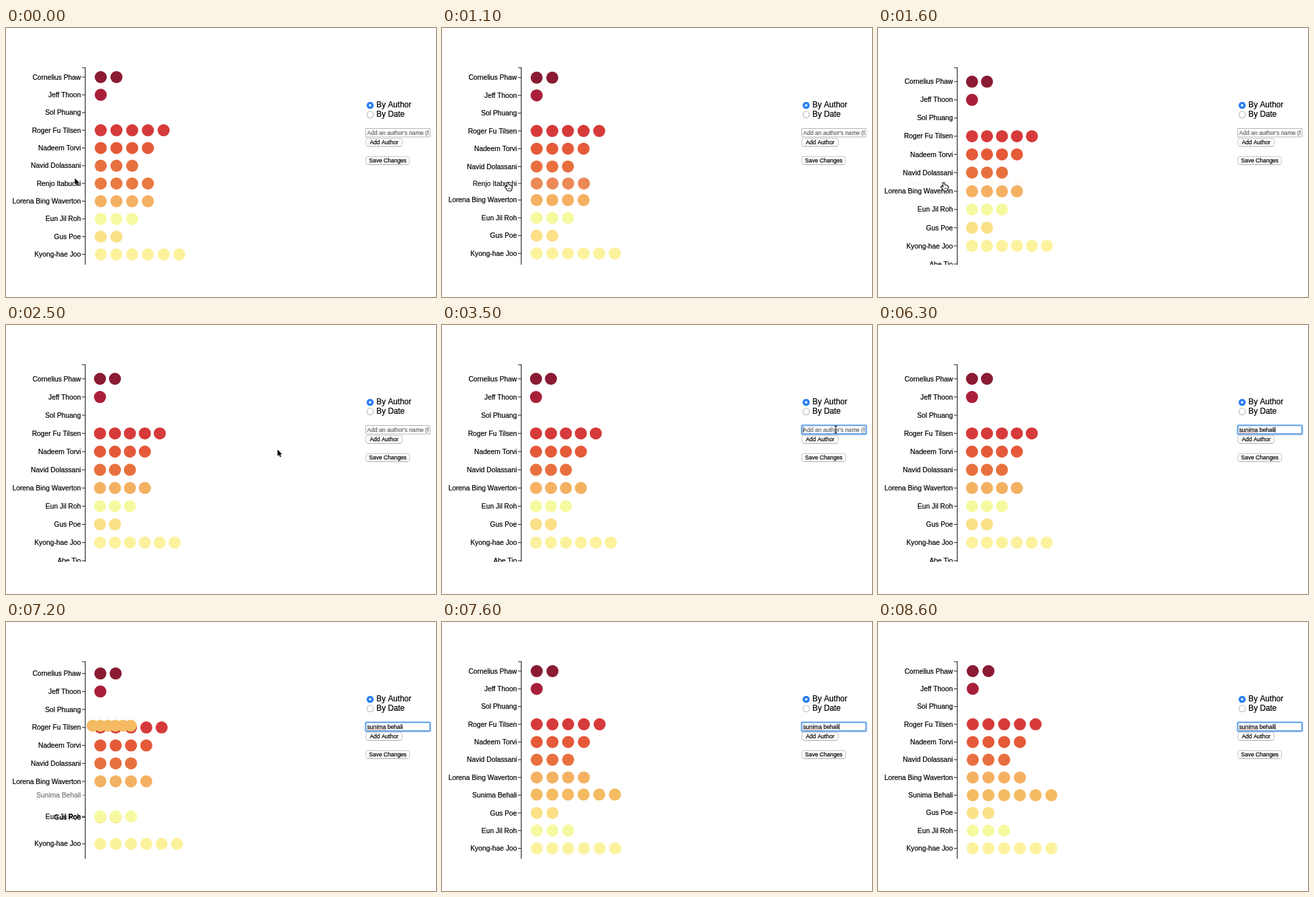
Write an HTML page with a canvas that moves like this. It is 640 by 400 pixels and loops after 8.7 s.

```html
<!DOCTYPE html>
<html lang="en">
<head>
<meta charset="utf-8">
<title>Author dot chart</title>
<style>
html, body { margin: 0; width: 100%; height: 100%; overflow: hidden; background: #fff; }
canvas { display: block; width: 640px; height: 400px; }
</style>
</head>
<body>
<canvas id="stage"></canvas>
<script>
const canvas = document.getElementById('stage');
const ctx = canvas.getContext('2d');
const ratio = window.devicePixelRatio || 1;
canvas.width = 640 * ratio;
canvas.height = 400 * ratio;

const LOOP = 8700;
const SANS = '"Liberation Sans", Arial, sans-serif';
const AXIS = 118, TOP = 59, BOTTOM = 352;
const REMOVE_AT = 800, ADD_AT = 6707, MOVE = 1000;
const FOCUS_AT = 3200, TYPE_AT = 4200;
const TYPED = 'sunima behali';

// slots: row index in the first, the shortened and the last layout
const rows = [
  { name: 'Cornelius Phaw', color: '#8a1b33', dots: 2, slots: [0, 0, 0] },
  { name: 'Jeff Thoon', color: '#a91f3a', dots: 1, slots: [1, 1, 1] },
  { name: 'Sol Phuang', color: '#c42d3a', dots: 0, slots: [2, 2, 2] },
  { name: 'Roger Fu Tilsen', color: '#d63a3a', dots: 5, slots: [3, 3, 3] },
  { name: 'Nadeem Torvi', color: '#e55a39', dots: 4, slots: [4, 4, 4] },
  { name: 'Navid Dolassani', color: '#e8703e', dots: 3, slots: [5, 5, 5] },
  { name: 'Renjo Itabuchi', color: '#e97a42', dots: 4, slots: [6, 6, 6], leaves: true },
  { name: 'Lorena Bing Waverton', color: '#f4b162', dots: 4, slots: [7, 6, 6] },
  { name: 'Gus Poe', color: '#fbe088', dots: 2, slots: [9, 8, 8] },
  { name: 'Eun Jil Roh', color: '#f5f9a0', dots: 3, slots: [8, 7, 9] },
  { name: 'Kyong-hae Joo', color: '#fcf29d', dots: 6, slots: [10, 9, 10] },
  { name: 'Abe Tio', color: '#eef5a0', dots: 0, slots: [11, 10, 11] },
  { name: 'Sunima Behali', color: '#f5bb62', dots: 6, slots: [7, 7, 7], enters: true }
];

const mix = (a, b, p) => a + (b - a) * p;
const clamp = v => Math.min(1, Math.max(0, v));
const ease = v => {
  v = clamp(v);
  return v < 0.5 ? 4 * v ** 3 : 1 - 4 * (1 - v) ** 3;
};
const wideY = i => 73 + 26.36 * i;
const shortY = i => 80 + 27.06 * i;

// A hairline stroke gives the text its slightly heavy weight.
function text(str, x, y, size, color = '#000', align = 'left') {
  ctx.font = `${size}px ${SANS}`;
  ctx.textAlign = align;
  ctx.fillStyle = ctx.strokeStyle = color;
  ctx.lineWidth = 0.22;
  ctx.fillText(str, x, y);
  ctx.strokeText(str, x, y);
}

function disc(x, y, r, color) {
  ctx.fillStyle = color;
  ctx.beginPath();
  ctx.arc(x, y, r, 0, 7);
  ctx.fill();
}

function line(x1, y1, x2, y2, color, width = 1) {
  ctx.strokeStyle = color;
  ctx.lineWidth = width;
  ctx.beginPath();
  ctx.moveTo(x1, y1);
  ctx.lineTo(x2, y2);
  ctx.stroke();
}

function box(x, y, w, h, r, stroke, width = 1, fill) {
  ctx.beginPath();
  ctx.roundRect(x, y, w, h, r);
  if (fill) {
    ctx.fillStyle = fill;
    ctx.fill();
  }
  ctx.strokeStyle = stroke;
  ctx.lineWidth = width;
  ctx.stroke();
}

function drawRow(row, removed, added) {
  const [a, b, c] = row.slots;
  let y = mix(mix(wideY(a), shortY(b), removed), wideY(c), added);
  let alpha = 1;
  if (row.leaves) {
    alpha = 1 - removed;
    y = wideY(a);
  }
  if (row.enters) {
    alpha = added;
    y = wideY(c);
  }
  const fixed = row.leaves || row.enters;
  const squeeze = fixed ? 0 : removed - added;
  const first = mix(141, 139.9, squeeze);
  const step = mix(23.4, 22.25, squeeze);

  ctx.globalAlpha = alpha;
  line(113, y, AXIS, y, '#222');
  text(row.name, 111.5, y + 3.6, 10.3, '#000', 'right');
  if (row.enters) ctx.globalAlpha = 1;
  for (let i = 0; i < row.dots; i++) {
    const x = first + step * i;
    if (row.enters) disc(mix(AXIS, x, added), mix(58, y, added), 9, row.color);
    else disc(x, y, 9, row.color);
  }
  ctx.globalAlpha = 1;
}

function drawChart(t) {
  const removed = ease((t - REMOVE_AT) / MOVE);
  const added = ease((t - ADD_AT) / MOVE);
  ctx.save();
  ctx.beginPath();
  ctx.rect(0, 0, 520, BOTTOM);
  ctx.clip();
  line(AXIS, TOP - 0.5, AXIS, BOTTOM, '#111', 1.1);
  line(113, TOP, AXIS, TOP, '#222');
  for (const row of rows) {
    if (row.leaves && removed === 1) continue;
    if (row.enters && t < ADD_AT) continue;
    drawRow(row, removed, added);
  }
  ctx.restore();
}

function keyTime(i) {
  return i < 6 ? TYPE_AT + 150 * i : 5250 + 160 * (i - 6);
}

function drawInput(t) {
  const focused = t >= FOCUS_AT;
  box(535.5, 149.5, 95.5, 12.5, 0, '#b4b4b4', 1, '#fff');
  if (focused) {
    box(535.2, 149, 96.2, 13.4, 1.5, 'rgba(110,170,240,0.55)', 3);
    box(535.5, 149.4, 95.6, 12.6, 1, '#5a9ce6', 1.3);
  }

  let count = 0;
  while (count < TYPED.length && t >= keyTime(count)) count++;
  const value = TYPED.slice(0, count);
  ctx.save();
  ctx.beginPath();
  ctx.rect(536, 149, 93, 13);
  ctx.clip();
  if (count) text(value, 537.5, 158.8, 8.65);
  else text("Add an author's name (first last)", 537.5, 158.8, 8.65, '#666');
  const width = count ? ctx.measureText(value).width : 0;
  if (count > 6) {
    ctx.fillStyle = '#b8504a';
    for (let x = 538; x < 565; x += 2) ctx.fillRect(x, 159.4, 1.1, 1);
  }
  const since = t - (count ? keyTime(count - 1) + 40 : FOCUS_AT);
  if (focused && since % 1000 < 500) {
    line(538 + width, 151.5, 538 + width, 160, '#111', 0.9);
  }
  ctx.restore();
}

function drawButton(label, y, w) {
  box(535.8, y, w, 11.8, 2.5, '#bdbdbd', 0.9, '#fff');
  line(538, y + 11.9, 533.5 + w, y + 11.9, '#a8a8a8', 0.6);
  text(label, 535.8 + w / 2, y + 9, 8.5, '#000', 'center');
}

function drawForm(t) {
  disc(542, 115, 5.3, '#2b7ff3');
  disc(542, 115, 1.8, '#fff');
  disc(542, 128.7, 5.3, '#a3a3a3');
  disc(542, 128.7, 4.5, '#fff');
  text('By Author', 551.3, 118.2, 11.85);
  text('By Date', 551.3, 132, 11.85);
  drawInput(t);
  drawButton('Add Author', 164.2, 53.8);
  drawButton('Save Changes', 191.2, 64.8);
}

function polygon(points, fill, stroke, width) {
  ctx.beginPath();
  points.forEach(([x, y]) => ctx.lineTo(x, y));
  ctx.closePath();
  ctx.lineJoin = 'round';
  ctx.lineWidth = width;
  ctx.strokeStyle = stroke;
  ctx.stroke();
  ctx.fillStyle = fill;
  ctx.fill();
}

const arrow = [[0, 0], [0, 9.5], [2.2, 7.6], [3.8, 11.2], [5.4, 10.5], [3.9, 7], [6.8, 6.8]];
const hand = [[-2, -5], [-0.7, -5.4], [0.3, -1.8], [4, -0.9], [5, 0.5], [4.6, 3.6], [3.6, 6.2],
  [-0.8, 6.2], [-2.6, 3.6], [-4.8, 1], [-4, 0], [-1.6, 1.4]];

function drawPointer(t) {
  if (t >= TYPE_AT) return;
  const settle = ease((t - 100) / 500);
  const travel = ease((t - 1900) / 1100);
  const x = mix(mix(102.5, 99, settle), 586, travel);
  const y = mix(mix(223.5, 235.5, settle), 155.5, travel);
  ctx.save();
  ctx.translate(x, y);
  if (x > 536 && y < 162) {
    line(0, -4.5, 0, 4.5, '#111');
    line(-2, -5, 2, -5, '#111');
    line(-2, 5, 2, 5, '#111');
  } else if (settle > 0.3 && t < 1900) {
    polygon(hand, '#fff', '#000', 2.2);
    line(0.6, 1.8, 0.6, 4.4, '#222', 0.8);
    line(2.4, 1.8, 2.4, 4.4, '#222', 0.8);
  } else {
    polygon(arrow, '#000', '#fff', 1);
  }
  ctx.restore();
}

function draw(now) {
  const t = now % LOOP;
  ctx.setTransform(ratio, 0, 0, ratio, 0, 0);
  ctx.fillStyle = '#fff';
  ctx.fillRect(0, 0, 640, 400);
  drawChart(t);
  drawForm(t);
  drawPointer(t);
}

const start = performance.now();
function tick() {
  draw(performance.now() - start);
  requestAnimationFrame(tick);
}
tick();
</script>
</body>
</html>
```
